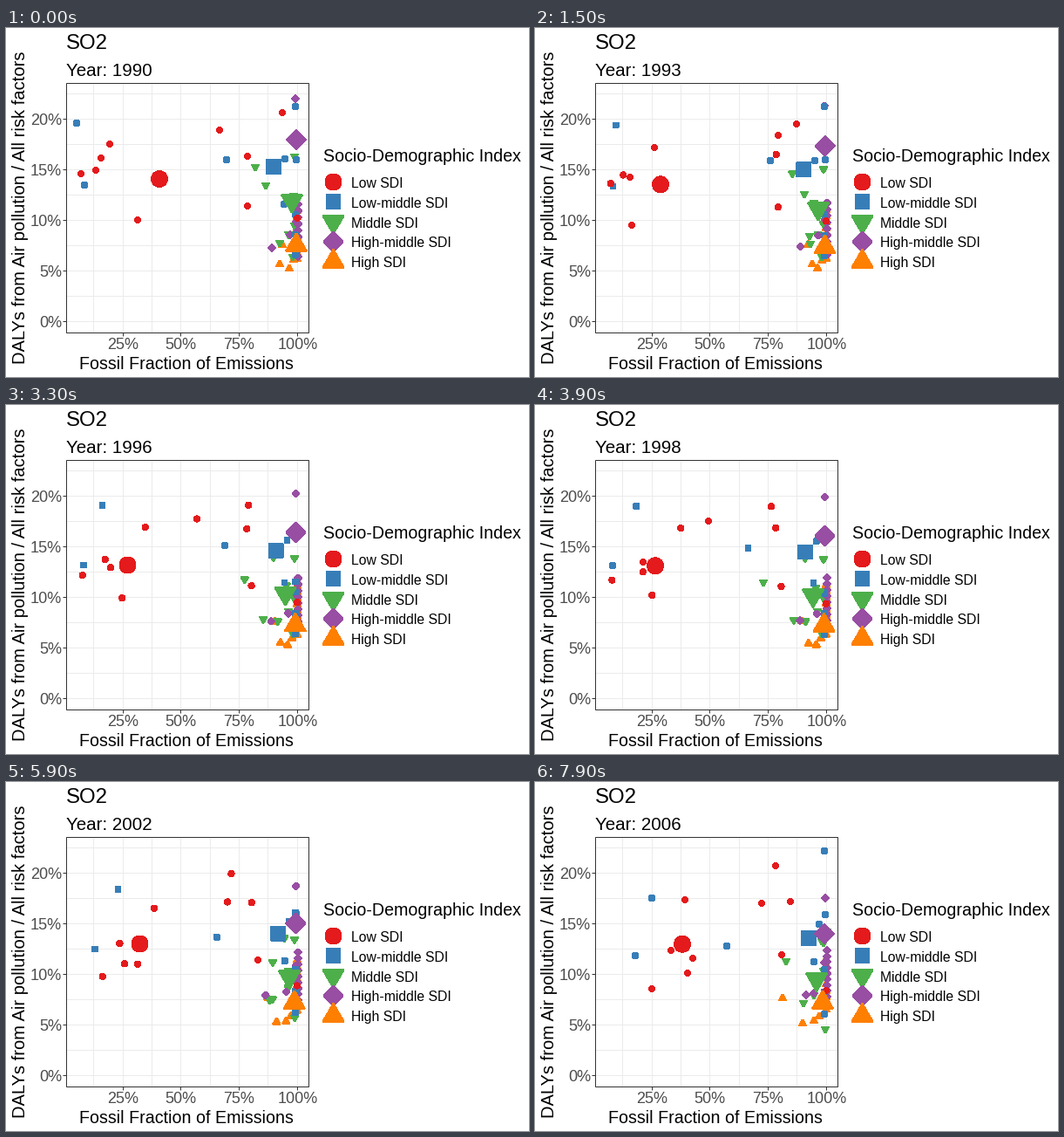
Animation, 600 px wide and 400 px high, one loop 8 s. Source, as a matplotlib script:

```python
import numpy as np
import matplotlib.pyplot as plt
from matplotlib.animation import FuncAnimation
from matplotlib.patches import Polygon, Rectangle

W, H, DPI = 600, 400, 100
PX = 72 / DPI
BIG, SMALL = 8.7, 2.9
LAST_STEP = 38
YEARS_PER_STEP = 25 / 59
GRID, AXIS, TICK_TEXT = "#EBEBEB", "#333333", "#4D4D4D"
plt.rcParams["font.family"] = "Liberation Sans"

# Stage coordinates are pixels with y pointing down.
fig = plt.figure(figsize=(W / DPI, H / DPI), dpi=DPI, facecolor="white")
ax = fig.add_axes([0, 0, 1, 1])
ax.set_xlim(0, W)
ax.set_ylim(H, 0)
ax.axis("off")


def ngon(n, r, turn):
    a = np.arange(n) * 2 * np.pi / n + turn
    return r * np.column_stack([np.cos(a), np.sin(a)])


# Outlines for a unit radius, with areas matched between shapes
STYLE = {
    "Low SDI": ("#E41A1C", ngon(48, 1, 0)),
    "Low-middle SDI": ("#377EB8", ngon(4, 1.253, np.pi / 4)),
    "Middle SDI": ("#4DAF4A", ngon(3, 1.555, np.pi / 2)),
    "High-middle SDI": ("#984EA3", ngon(4, 1.253, 0)),
    "High SDI": ("#FF7F00", ngon(3, 1.555, -np.pi / 2)),
}
LOW, LOWMID, MID, HIGHMID, HIGH = STYLE


def path(*stops):
    """Straight moves between (step, x, y) stops."""
    steps, xs, ys = zip(*stops)
    return lambda k: (np.interp(k, steps, xs), np.interp(k, steps, ys))


def drift(x0, y0, x1, y1):
    return path((0, x0, y0), (LAST_STEP, x1, y1))


def settle(xy, drop, tau):
    """Fall by drop pixels, quickly at first, on top of a path."""
    def at(k):
        x, y = xy(k)
        return x, y + drop * (1 - np.exp(-k / tau))
    return at


def column(x, n, first, last):
    """Points stacked near 100 %, each drifting between two heights."""
    heights = zip(np.linspace(*first, n), np.linspace(*last, n))
    return [drift(x, a, x, b) for a, b in heights]


countries = {
    HIGH: [
        path((0, 314, 271), (6, 318, 271), (38, 307, 277)),
        path((0, 317, 249), (32, 298, 247), (38, 284, 248)),
        drift(325, 276, 320, 274),
        drift(330, 266, 326, 269),
        *column(334, 9, (210, 265), (203, 261)),
    ],
    MID: [
        path((0, 286, 159), (11, 303, 173), (38, 329, 182)),
        path((0, 298, 180), (6, 309, 190), (18, 262, 203), (23, 315, 207),
             (38, 288, 205)),
        path((0, 314, 246), (6, 315, 238), (11, 293, 244), (38, 308, 253)),
        path((0, 324, 236), (6, 316, 247), (32, 304, 249), (38, 320, 244)),
        path((23, 329, 262), (32, 333, 276), (38, 333, 283)),
        path((0, 331, 147), (11, 331, 174), (38, 331, 184)),
        path((0, 330, 192), (6, 320, 200), (38, 326, 224)),
        drift(325, 237, 323, 235),
        drift(331, 226, 331, 216),
        drift(335, 128, 335, 171),
    ],
    HIGHMID: [
        path((0, 305, 252), (18, 304, 247), (32, 295, 243), (38, 311, 244)),
        drift(332, 81, 333, 133),
        drift(326, 237, 320, 242),
        drift(333, 222, 332, 207),
        *column(335, 9, (202, 262), (193, 246)),
    ],
    LOWMID: [
        path((0, 81, 109), (23, 126, 118), (38, 134, 133)),
        path((0, 90, 180), (18, 89, 184), (38, 115, 199)),
        path((0, 253, 151), (6, 270, 152), (23, 234, 169), (32, 248, 185),
             (38, 220, 188)),
        path((6, 332, 90), (11, 332, 185), (23, 332, 238), (32, 332, 79)),
        drift(320, 150, 326, 163),
        drift(333, 151, 333, 152),
        drift(319, 202, 320, 206),
        *column(332, 3, (214, 260), (215, 266)),
    ],
    LOW: [
        path((0, 86, 167), (23, 89, 210), (32, 128, 233), (38, 134, 237)),
        path((0, 103, 163), (11, 100, 173), (18, 124, 180), (32, 133, 187),
             (38, 156, 193)),
        path((0, 109, 149), (6, 109, 171), (32, 141, 215), (38, 175, 219)),
        path((0, 119, 133), (6, 137, 137), (23, 180, 143), (32, 162, 146),
             (38, 172, 135)),
        path((0, 151, 220), (6, 111, 226), (11, 132, 226), (23, 136, 212),
             (38, 181, 202)),
        path((0, 245, 117), (6, 279, 123), (18, 199, 133), (23, 267, 133),
             (32, 244, 141), (38, 260, 139)),
        path((0, 277, 147), (23, 276, 139), (38, 293, 137)),
        path((0, 277, 204), (23, 284, 209), (32, 293, 200), (38, 283, 198)),
        path((0, 317, 97), (6, 300, 110), (23, 259, 119), (32, 258, 94),
             (38, 276, 96)),
        drift(334, 218, 334, 239),
    ],
}
means = {
    LOW: settle(path((0, 176, 173), (6, 144, 173), (18, 138, 173),
                     (38, 169, 173)), 13, 9),
    LOWMID: drift(307, 159, 314, 179),
    MID: settle(path((0, 328, 198), (18, 319, 198), (23, 326, 198),
                     (38, 323, 198)), 32, 18),
    HIGHMID: drift(333, 128, 332, 174),
    HIGH: settle(drift(333, 249, 330, 249), 4, 8),
}


def text(x, y, s, px, color="black", **kw):
    return ax.text(x, y, s, fontsize=px * PX, color=color, **kw)


def line(xs, ys, color):
    ax.plot(xs, ys, color=color, lw=PX, solid_capstyle="butt", zorder=1,
            snap=False)


def glyph(name, radius, x=0, y=0):
    color, shape = STYLE[name]
    return ax.add_patch(Polygon(shape * radius + (x, y), facecolor=color,
                                edgecolor=color, lw=1.4 * PX, zorder=4,
                                antialiased=False, snap=False))


def draw_chart():
    left, right, top, bottom = 69.5, 347.5, 63.5, 349.5
    for p in np.arange(12.5, 101, 12.5):
        x = np.floor(67.6 + p * 2.667) + 0.5
        line([x, x], [top, bottom], GRID)
        if p % 25 == 0:
            line([x, x], [bottom, bottom + 4], AXIS)
            text(x, 368, f"{p:.0f}%", 18, TICK_TEXT, ha="center")
    for p in np.arange(0, 23, 2.5):
        y = 336.5 - p * 11.6
        line([left, right], [y, y], GRID)
        if p % 5 == 0:
            line([left - 4, left], [y, y], AXIS)
            text(64, y + 6.5, f"{p:.0f}%", 18.2, TICK_TEXT, ha="right")
    ax.add_patch(Rectangle((left, top), right - left, bottom - top, fill=False,
                           edgecolor=AXIS, lw=PX, zorder=6, snap=False))
    text(68.5, 24, "SO2", 24)
    text(207, 391, "Fossil Fraction of Emissions", 19.6, ha="center")
    text(22, 206, "DALYs from Air pollution / All risk factors", 20.2,
         rotation=90, ha="center", va="baseline", rotation_mode="anchor")
    text(363.5, 153, "Socio-Demographic Index", 19.6)
    for i, name in enumerate(STYLE):
        y = 176.5 + 22.8 * i
        glyph(name, BIG, 375.5, y)
        text(395.5, y + 6.5, name, 15.8)


draw_chart()
year = text(69, 55, "", 20.5)

points = [(glyph(name, SMALL), STYLE[name][1] * SMALL, move)
          for name, moves in countries.items() for move in moves]
points += [(glyph(name, BIG), STYLE[name][1] * BIG, move)
           for name, move in means.items()]


def update(i):
    step = 0 if i < 5 else 1 + (i - 5) // 2
    year.set_text(f"Year: {1990 + int(step * YEARS_PER_STEP + 0.5)}")
    for patch, shape, move in points:
        patch.set_xy(shape + move(step))
    return [year] + [p[0] for p in points]


anim = FuncAnimation(fig, update, frames=80, interval=100, repeat=True,
                     repeat_delay=0, init_func=lambda: update(0))
plt.show()
```
